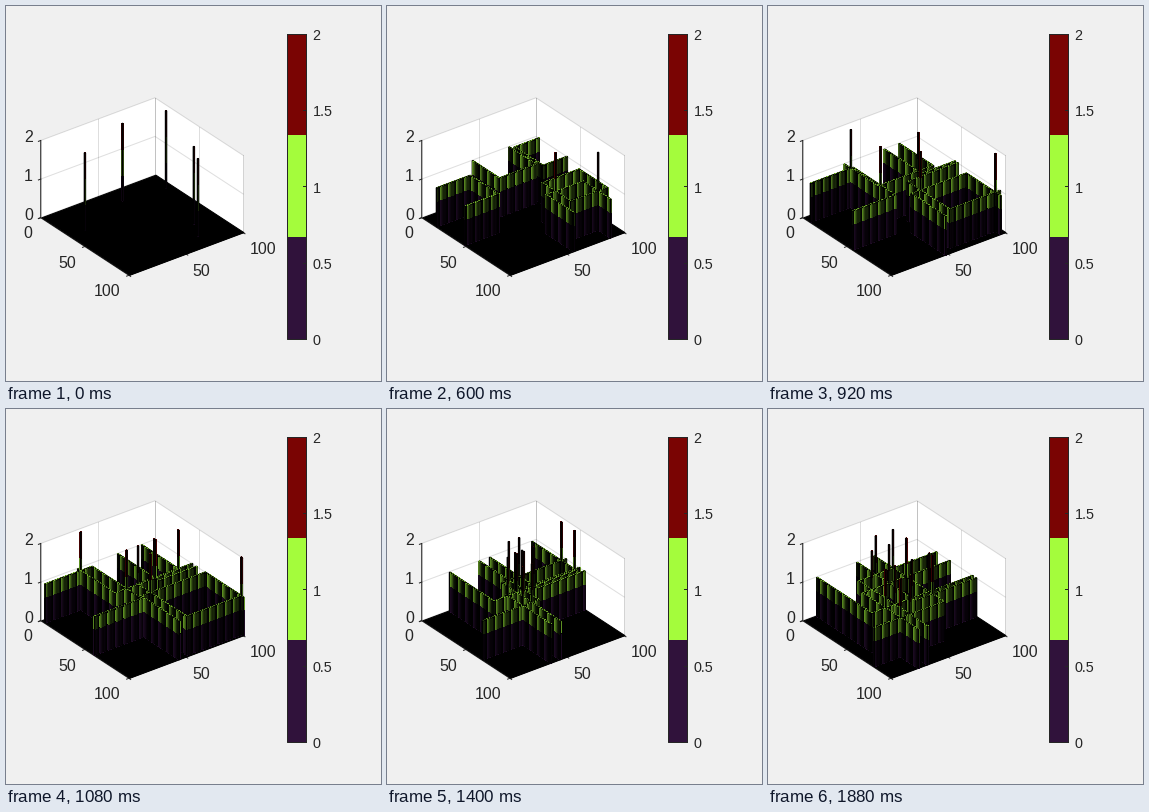
These frames come from a looping animation (375 px wide and 375 px high, 1.92 s). A matplotlib script:

```python
import numpy as np
import matplotlib.pyplot as plt
from matplotlib.animation import FuncAnimation
from matplotlib.collections import PolyCollection

SIZE, DPI, FRAMES, STEP = 375, 100, 48, 40
N = 100
HALF = 0.4  # half the width of a bar
PX = 72 / DPI
EDGE = 0.85 * PX
INK = "#262626"
PURPLE, GREEN, RED = [tuple(c / 255 for c in rgb) + (1,) for rgb in
                      ((48, 18, 59), (164, 252, 60), (122, 4, 3))]
BANDS = PURPLE, GREEN, RED
CLEAR, BLACK = (0, 0, 0, 0), (0, 0, 0, 1)
SEEDS = [(32, 14), (15, 60), (19, 95), (70, 80), (85, 72)]

# screen offset of one unit along u, v and z
BASIS = np.array([[0.882, 0.576], [1.143, -0.427], [0, -38.6]])
ORIGIN = np.array([35.2, 212.2])


def project(points):
    return np.asarray(points, float) @ BASIS + ORIGIN


fig = plt.figure(figsize=(SIZE / DPI, SIZE / DPI), dpi=DPI, facecolor="#f0f0f0")
ax = fig.add_axes([0, 0, 1, 1])
ax.set_xlim(0.5, SIZE + 0.5)
ax.set_ylim(SIZE + 0.5, 0.5)
ax.axis("off")


def line(points, z=2, **kw):
    x, y = np.transpose(points)
    ax.plot(x, y, lw=PX, zorder=z, **{"color": INK, **kw})


def label(x, y, text, size=16, ha="center"):
    ax.text(x, y, text, fontsize=size * PX, color=INK, ha=ha,
            va="center_baseline", family="Liberation Sans")


def box_axes():
    for wall in ([(0, 0, 0), (0, 0, 2), (0, N, 2), (0, N, 0)],
                 [(0, N, 0), (0, N, 2), (N, N, 2), (N, N, 0)]):
        ax.fill(*project(wall).T, color="white", lw=0, zorder=1)
    for k in (0, 50, 100):
        line(project([(0, k, 0), (0, k, 2)]), alpha=0.15)
        line(project([(k, N, 0), (k, N, 2)]), alpha=0.15)
    for z in (0, 1, 2):
        line(project([(0, 0, z), (0, N, z), (N, N, z)]), alpha=0.15)
    line(project([(0, 0, 2), (0, 0, 0), (N, 0, 0), (N, N, 0)]))
    for k in (0, 50, 100):
        line(project([(k, 0, 0), (k, -2, 0)]))
        line(project([(N, k, 0), (N + 2, k, 0)]))
    for z in (0, 1, 2):
        line(project([(0, 0, z), (0, -2, z)]))
        label(23, 208.5 - 39 * z, str(z))
    for x, y, text in ((22, 227, "0"), (62, 256, "50"), (102, 284, "100"),
                       (196, 265, "50"), (257.5, 242.5, "100")):
        label(x, y, text)
    a, b = 1 - HALF, N + HALF
    floor = [(a, a, 0), (b, a, 0), (b, b, 0), (a, b, 0)]
    ax.fill(*project(floor).T, fc="black", ec="black", lw=PX, zorder=3)


def colorbar(left=281, right=300.5, top=28, bottom=333.5):
    third = (bottom - top) / 3
    for k, color in enumerate((RED, GREEN, PURPLE)):
        y = top + k * third
        ax.fill([left, right, right, left], [y, y, y + third, y + third],
                color=color, lw=0, zorder=1)
    line([(left, top), (right, top), (right, bottom), (left, bottom), (left, top)])
    for k, text in enumerate(("0", "0.5", "1", "1.5", "2")):
        y = bottom - k * (bottom - top) / 4
        line([(right - 3, y), (right, y)])
        label(307, y + 0.8, text, 14.4, "left")


def bar_parts(height):
    """Visible faces and edges of one bar, relative to its foot."""
    def corner(u, v, z):
        return np.array([u * HALF, v * HALF, z]) @ BASIS

    def rim(z):
        return [corner(-1, -1, z), corner(1, -1, z), corner(1, 1, z)]

    left, front, right = rim(height)
    foot, back = rim(0), corner(-1, 1, height)
    parts = []
    for k, color in enumerate(BANDS):
        low, high = k * 2 / 3, min((k + 1) * 2 / 3, height)
        if low < height:
            parts.append((rim(low) + rim(high)[::-1], color, CLEAR))
    parts.append(([left, front, right, back], BANDS[height], CLEAR))
    parts.append((foot + [right, back, left, foot[0]], CLEAR, BLACK))
    parts.append(([left, front, foot[1], front, right], CLEAR, BLACK))
    return [(np.array(p), face, edge) for p, face, edge in parts]


BARS = {h: bar_parts(h) for h in (1, 2)}
U, V = np.mgrid[1:N + 1, 1:N + 1]


def heights_at(t):
    """Square fronts spread one cell per step and add up where they cross."""
    z = np.zeros((N, N), int)
    for u, v in SEEDS:
        dist = np.maximum(abs(U - u), abs(V - v))
        z += 2 * (dist == 0) if t == 0 else (dist == t + 1)
    return np.minimum(z, 2)


def update(t):
    z = heights_at(t)
    cells = np.argwhere(z > 0)
    cells = cells[np.lexsort((-cells[:, 1], cells[:, 0]))]  # back to front
    shifts = (cells + 1) @ BASIS[:2] + ORIGIN
    verts, faces, edges = [], [], []
    for (i, j), shift in zip(cells, shifts):
        for poly, face, edge in BARS[z[i, j]]:
            verts.append(poly + shift)
            faces.append(face)
            edges.append(edge)
    surface.set_verts(verts, closed=False)
    surface.set_facecolor(faces)
    surface.set_edgecolor(edges)
    surface.set_linewidth([EDGE if e[3] else 0 for e in edges])
    surface.set_antialiased([bool(e[3]) for e in edges])
    return [surface]


box_axes()
colorbar()
surface = PolyCollection([], zorder=4, capstyle="butt", joinstyle="bevel", snap=False)
ax.add_collection(surface, autolim=False)
anim = FuncAnimation(fig, update, frames=FRAMES, interval=STEP,
                     init_func=lambda: update(0), repeat=True, repeat_delay=0)
plt.show()
```
